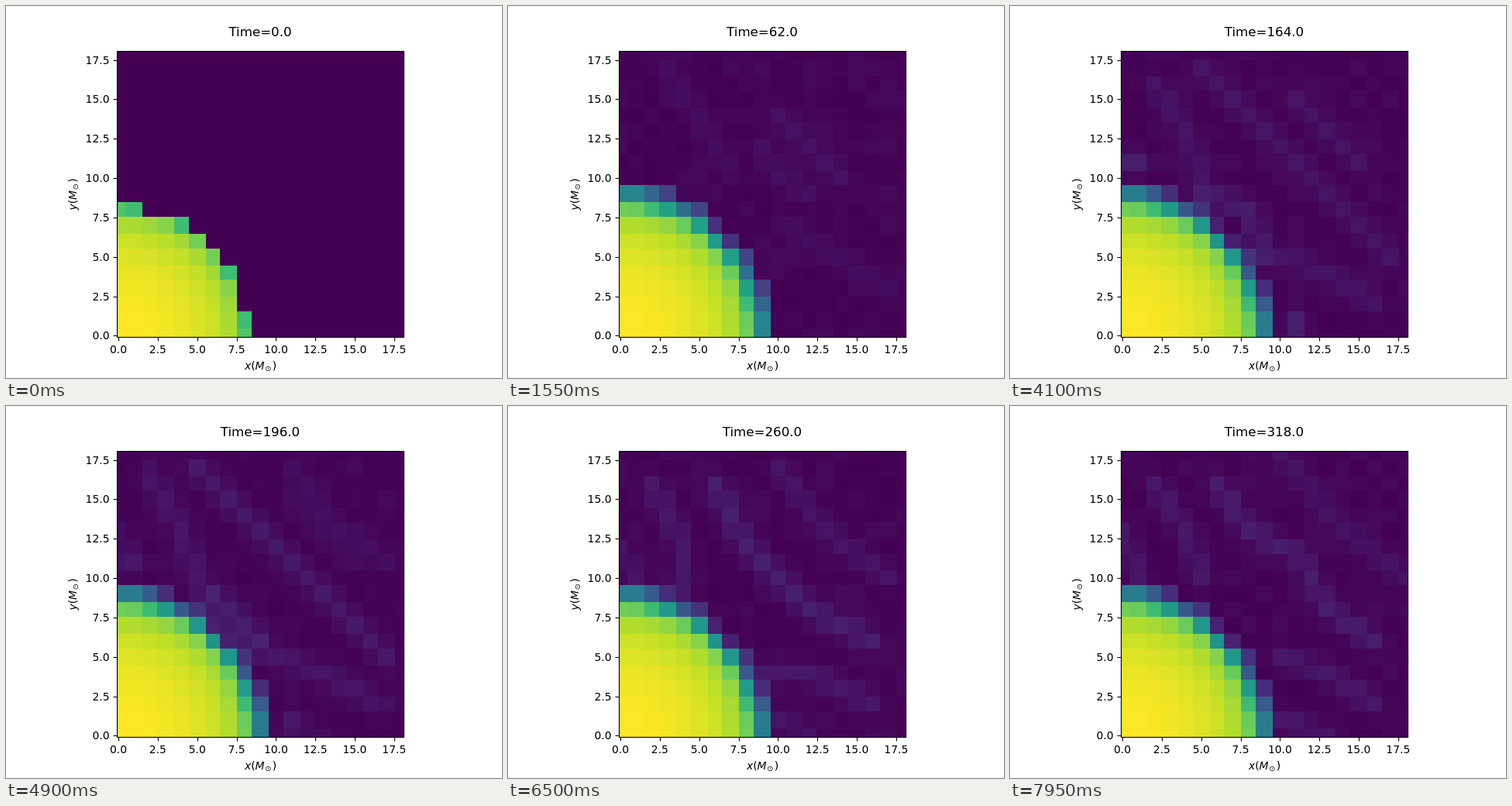
These frames come from a looping animation (640 by 480 pixels, 8000 ms). An HTML page with a canvas:

```html
<!DOCTYPE html>
<html lang="en">
<head>
<meta charset="utf-8">
<title>Density slice</title>
<style>
  html, body { margin: 0; width: 100%; height: 100%; overflow: hidden; background: #fff; }
  canvas { display: block; }
</style>
</head>
<body>
<canvas id="stage" width="640" height="480"></canvas>
<script>
const ctx = document.getElementById('stage').getContext('2d');
const LOOP = 8000, STEP = 50, CELLS = 19;
const LEFT = 143.2, BOTTOM = 427.2, SAMPLE = 369.6 / 200, UNIT = SAMPLE * 11;
const FONT = '"DejaVu Sans", sans-serif';

const clamp = (v, lo, hi) => Math.min(hi, Math.max(lo, v));
const mix = (a, b, k) => a + (b - a) * k;

// Viridis colours at steps of 0.1
const VIRIDIS = [
  [68, 1, 84], [72, 36, 117], [65, 68, 135], [53, 95, 141], [42, 120, 142], [33, 145, 140],
  [34, 168, 132], [68, 191, 112], [122, 209, 81], [189, 223, 38], [253, 231, 37]
];
function colour(v) {
  const s = clamp(v, 0, 1) * 10, i = Math.min(9, Math.floor(s));
  return `rgb(${VIRIDIS[i].map((c, n) => Math.round(mix(c, VIRIDIS[i + 1][n], s - i)))})`;
}

// Cells are alternately 12 and 10 samples wide, with half cells at both ends.
const edge = k => k <= 0 ? 0 : k >= CELLS ? 200 : 11 * k - (k % 2 ? 5 : 4);
const edgeX = k => Math.round(LEFT + edge(k) * SAMPLE);
const edgeY = k => Math.round(BOTTOM - edge(k) * SAMPLE);

// Cells on the rim of the star: x, y, value at first, value when settled
const RIM = [
  [9, 0, .45, .415], [9, 1, .45, .415], [9, 2, .32, .285], [9, 3, .19, .125],
  [8, 3, .57, .54], [8, 4, .36, .275], [8, 5, .2, .145], [7, 5, .56, .52],
  [6, 6, .55, .51], [7, 6, .14, .09]
];

// Faint waves around the star: strength, then the points of a ridge
const WAVES = [
  { at: 0, ridges: [] },
  { at: 1550, ridges: [[.047, 10, 14, 12, 12], [.035, 3, 17, 7, 10.5], [.042, 9, 12, 10, 10]] },
  { at: 2850, ridges: [[.05, 10, 15, 12, 13], [.07, 6, 14, 9, 12, 11, 10.5],
                       [.055, 2, 15, 3.3, 13, 4, 11], [.06, 6, 8, 7, 7.4]] },
  { at: 4100, ridges: [[.05, 11, 15, 13, 13], [.055, 5, 17, 8, 14, 11, 11],
                       [.055, 2, 16, 4, 13, 5, 10], [.08, 0, 11, 1, 11], [.08, 5, 9, 8, 8]] },
  { at: 5550, ridges: [[.055, 11, 17, 14, 13], [.08, 5, 17, 8, 14, 11, 11],
                       [.065, 2, 17, 4, 13, 5, 10], [.055, 0, 13, 1, 11], [.12, 6, 9, 7, 7]] },
  { at: 6500, ridges: [[.055, 10, 17, 13, 13], [.085, 6, 16, 8, 12, 10, 10],
                       [.065, 2, 16, 4, 12, 4, 9], [.05, 0, 12, 1, 10]] },
  { at: 7950, ridges: [[.05, 10, 18, 14, 13], [.08, 6, 16, 8, 13, 12, 11],
                       [.065, 2, 16, 4, 13, 5, 10], [.06, 0, 13, 1, 10]] }
];

function segmentDistance(x, y, ax, ay, bx, by) {
  const dx = bx - ax, dy = by - ay;
  const k = clamp(((x - ax) * dx + (y - ay) * dy) / (dx * dx + dy * dy), 0, 1);
  return Math.hypot(x - ax - k * dx, y - ay - k * dy);
}

function grain(x, y, seed) {
  const s = Math.sin(x * 12.99 + y * 78.23 + seed * 37.7) * 43758.5;
  return .022 * (s - Math.floor(s)) ** 2;
}

// The field is mirrored about the diagonal, so only y >= x is worked out.
function waveStrength(x, y, wave, seed) {
  let best = seed ? grain(x, y, seed) : 0;
  for (const [strength, ...p] of wave.ridges)
    for (let i = 0; i + 3 < p.length; i += 2) {
      const d = segmentDistance(x, y, p[i], p[i + 1], p[i + 2], p[i + 3]);
      best = Math.max(best, strength * Math.exp(-((d / .8) ** 2)));
    }
  return best;
}
const cells = [];
for (let y = 0; y < CELLS; y++)
  for (let x = 0; x <= y; x++)
    cells.push({
      x, y, r: Math.hypot(x, y),
      rim: RIM.find(([a, b]) => a === y && b === x),
      waves: WAVES.map((wave, i) => waveStrength(x, y, wave, i))
    });

function starValue(cell, t) {
  const swell = 1 - Math.exp(-t / 180);
  if (cell.rim) return swell * mix(cell.rim[2], cell.rim[3], clamp((t - 1550) / 1300, 0, 1));
  const radius = mix(8.14, 8.32, swell);
  if (cell.r >= radius) return 0;
  const a = Math.PI * cell.r / radius;
  return 1 + .155 * Math.log10(a ? Math.sin(a) / a : 1);
}

function fillCell(x, y) {
  const left = edgeX(x), top = edgeY(y + 1);
  ctx.fillRect(left, top, edgeX(x + 1) - left, edgeY(y) - top);
}

function drawDensity(t) {
  let i = 0;
  while (i < WAVES.length - 2 && t >= WAVES[i + 1].at) i++;
  const k = (t - WAVES[i].at) / (WAVES[i + 1].at - WAVES[i].at);
  for (const cell of cells) {
    const wave = mix(cell.waves[i], cell.waves[i + 1], k);
    ctx.fillStyle = colour(Math.max(starValue(cell, t), wave));
    fillCell(cell.x, cell.y);
    fillCell(cell.y, cell.x);
  }
}

function text(str, x, y, size, align) {
  ctx.font = `${size}px ${FONT}`;
  ctx.textAlign = align;
  ctx.fillText(str, x, y);
}

function line(x1, y1, x2, y2) {
  ctx.beginPath();
  ctx.moveTo(x1, y1);
  ctx.lineTo(x2, y2);
  ctx.stroke();
}

function axisLabel(name, x, y, angle) {
  const parts = [[name, 'italic', 13.89, 0, 0], ['(', '', 13.89, 0, 0], ['M', 'italic', 13.89, 0, .6],
                 ['\u2299', '', 9.72, 2.2, 1.4], [')', '', 13.89, 0, 0]];
  const setFont = ([, style, size]) => ctx.font = `${style} ${size}px ${FONT}`;
  const widths = parts.map(part => (setFont(part), ctx.measureText(part[0]).width + part[4]));
  ctx.save();
  ctx.translate(x, y);
  ctx.rotate(angle);
  ctx.textAlign = 'left';
  let pen = -widths.reduce((a, b) => a + b) / 2;
  parts.forEach((part, i) => {
    setFont(part);
    ctx.fillText(part[0], pen, part[3]);
    pen += widths[i];
  });
  ctx.restore();
}

function drawAxes() {
  ctx.fillStyle = ctx.strokeStyle = '#000';
  ctx.lineWidth = 1.11;
  ctx.strokeRect(143.5, 58.5, 370, 369);
  for (let v = 0; v <= 17.5; v += 2.5) {
    const x = LEFT + SAMPLE + v * UNIT, y = BOTTOM - SAMPLE - v * UNIT;
    const px = Math.round(x) + .5, py = Math.round(y) + .5;
    line(px, 427.5, px, 432.5);
    line(138.5, py, 143.5, py);
    text(v.toFixed(1), x, 448, 13.89, 'center');
    text(v.toFixed(1), 133.5, Math.round(y + 5.06), 13.89, 'right');
  }
  axisLabel('x', 328.5, 469, 0);
  axisLabel('y', 91, 243, -Math.PI / 2);
}

function draw(now) {
  const step = Math.floor((now % LOOP) / STEP);
  ctx.fillStyle = '#fff';
  ctx.fillRect(0, 0, 640, 480);
  drawDensity(step * STEP);
  drawAxes();
  text(`Time=${(step * 2).toFixed(1)}`, 328, 39, 16.67, 'center');
}

function tick() {
  draw(performance.now());
  requestAnimationFrame(tick);
}
tick();
</script>
</body>
</html>
```
